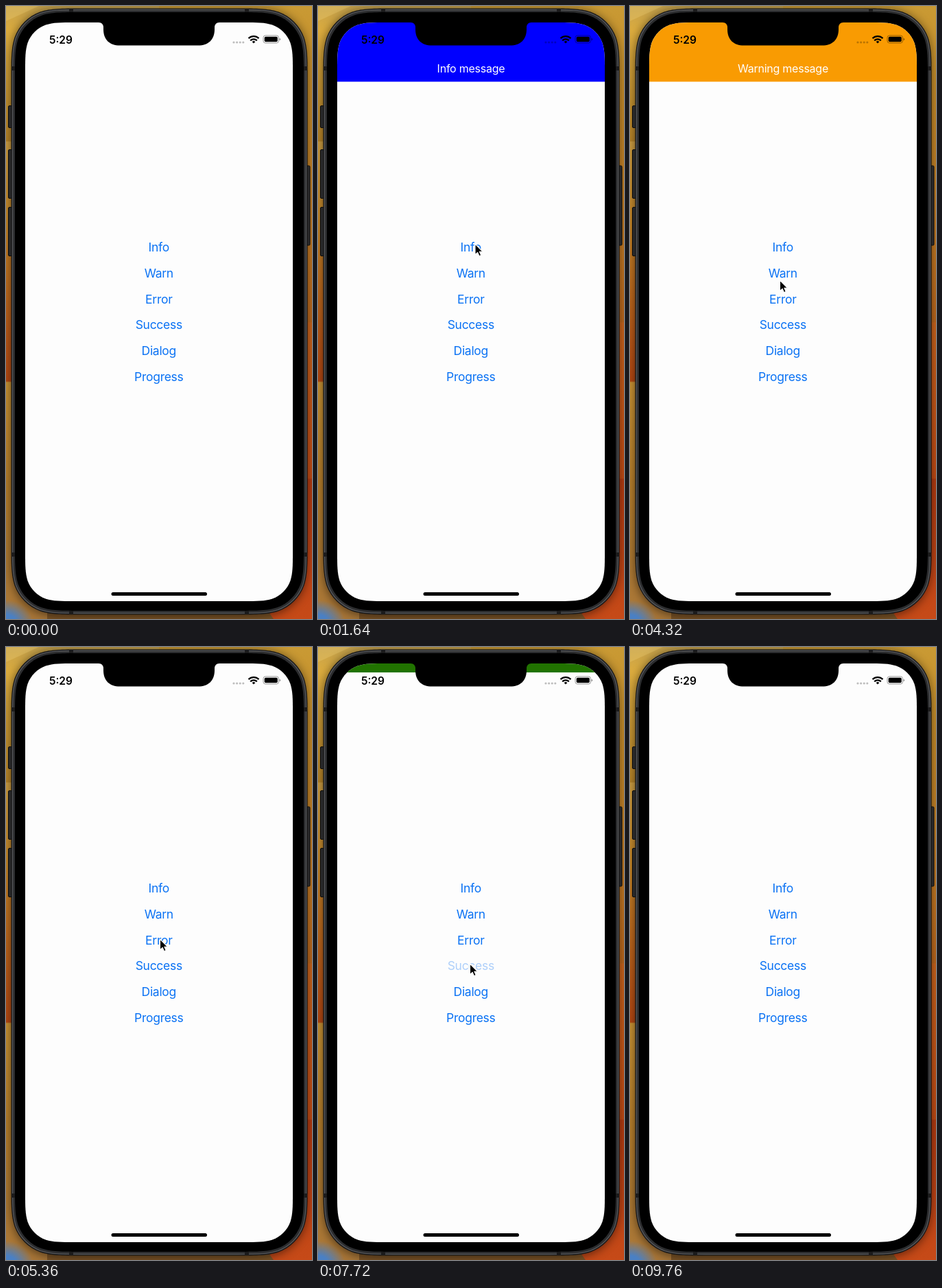
Recreate the animation shown at these times as an HTML page. Size 446x894 px, loop 9.8 s.

```html
<!DOCTYPE html>
<html lang="en">
<head>
<meta charset="utf-8">
<title>Banner messages</title>
<style>
  html, body { margin: 0; width: 100%; height: 100%; overflow: hidden; background: #b87a28; }
  svg { display: block; }
  text { font-family: Inter, sans-serif; text-anchor: middle; }
  #labels { font-size: 17.5px; letter-spacing: -.28px; fill: #0a72f4; }
  #title { font-size: 16px; letter-spacing: -.24px; fill: #fff; }
  #clock { font-size: 15.5px; font-weight: 600; }
</style>
</head>
<body>
<svg width="446" height="894" viewBox="0 0 446 894">
  <defs>
    <linearGradient id="left" x2="0" y2="1">
      <stop offset="0" stop-color="#c3a04c"/><stop offset=".04" stop-color="#dcac3e"/>
      <stop offset=".22" stop-color="#b98529"/><stop offset=".222" stop-color="#cf9f42"/>
      <stop offset=".36" stop-color="#c58527"/><stop offset=".5" stop-color="#bd621b"/>
      <stop offset=".612" stop-color="#b64812"/><stop offset=".614" stop-color="#cb9434"/>
      <stop offset=".78" stop-color="#b9802c"/><stop offset="1" stop-color="#a87638"/>
    </linearGradient>
    <linearGradient id="right" x2="0" y2="1">
      <stop offset="0" stop-color="#c99a34"/><stop offset=".12" stop-color="#c48c2a"/>
      <stop offset=".4" stop-color="#c07622"/><stop offset=".515" stop-color="#b9651c"/>
      <stop offset=".517" stop-color="#c8631c"/><stop offset=".77" stop-color="#c04a14"/>
      <stop offset=".772" stop-color="#b23a10"/><stop offset="1" stop-color="#c64a18"/>
    </linearGradient>
    <radialGradient id="blue">
      <stop offset=".4" stop-color="#4a80c4"/><stop offset="1" stop-color="#4a80c4" stop-opacity="0"/>
    </radialGradient>
    <filter id="soft"><feGaussianBlur stdDeviation="7"/></filter>
    <clipPath id="screen"><path data-box="28 24 390 844 47.3"/></clipPath>
  </defs>

  <!-- wallpaper -->
  <rect width="223" height="894" fill="url(#left)"/>
  <rect x="223" width="223" height="894" fill="url(#right)"/>
  <path d="M0 22L48 0H0Z" fill="#e6c56c" opacity=".4"/>
  <path d="M60 880H380L390 894H60Z" fill="#7c5426"/>
  <ellipse cx="0" cy="902" rx="40" ry="36" fill="url(#blue)"/>
  <path data-box="7 4 432 886 67" opacity=".5" filter="url(#soft)"/>

  <!-- phone -->
  <g fill="#29292a" stroke="#0c0c0c">
    <rect x="3.5" y="145.5" width="7" height="32" rx="1.5"/>
    <rect x="3.5" y="209.5" width="7" height="71" rx="1.5"/>
    <rect x="3.5" y="293.5" width="7" height="71" rx="1.5"/>
    <rect x="436" y="233" width="7" height="116" rx="1.5"/>
  </g>
  <path data-box="7.5 3.5 432 884 67" fill="#161617"/>
  <path data-box="9.5 5.5 428 880 65" fill="#2c2d2f" stroke="#56575a" stroke-width="1.4"/>
  <path d="M92 6.5h6M348 6.5h6M92 884.5h6M348 884.5h6M10.5 88v6M436.5 88v6M10.5 797v6M436.5 797v6" stroke="#1b1b1c" stroke-width="5"/>
  <path data-box="13 9 421 873 62"/>

  <g clip-path="url(#screen)">
    <rect x="28" y="24" width="390" height="844" fill="#fdfdfd"/>
    <g id="labels"></g>
    <g id="banner">
      <rect id="fill" x="28" y="24" width="390" height="86.4"/>
      <text id="title" x="223" y="96.5"></text>
    </g>
    <text id="clock" x="79.9" y="54.5">5:29</text>
    <g opacity=".25">
      <circle cx="332" cy="53" r="1.6"/><circle cx="336.6" cy="53" r="1.6"/>
      <circle cx="341.2" cy="53" r="1.6"/><circle cx="345.8" cy="53" r="1.6"/>
    </g>
    <g fill="none" stroke="#000" stroke-width="2.3">
      <path d="M353.5 47.2a10.8 10.8 0 0 1 15 0M356.2 50.3a6.9 6.9 0 0 1 9.6 0"/>
      <path d="M361 54.6l-2.3-2.4a3.3 3.3 0 0 1 4.6 0z" fill="#000" stroke="none"/>
    </g>
    <rect x="375" y="43" width="22.5" height="11" rx="3.2" fill="none" stroke="#000" opacity=".4"/>
    <rect x="376.7" y="44.7" width="19.1" height="7.6" rx="1.8"/>
    <path d="M398.6 46.8q1.6.7 1.6 1.8t-1.6 1.8z" opacity=".45"/>
    <path d="M135 24q7 0 7 8v2c0 15 9 23.6 24 23.6h114c15 0 24-8.6 24-23.600v-2q0-8 7-8z"/>
    <rect x="153.5" y="855" width="139.5" height="5" rx="2.5"/>
  </g>
  <path id="cursor" d="M0 0V15.6L3.6 12.300L6 17.700L8.700 16.600L6.400 11.300H11.100Z" stroke="#fff" stroke-width="1.1" stroke-linejoin="round"/>
</svg>
<script>
const LOOP = 9800, SLIDE = 350, HOLD = 1500, PRESS = 90, HEIGHT = 86.4;
const $ = id => document.getElementById(id);

const messages = [
  { start: 1137, color: "#0000ff", text: "Info message" },
  { start: 3300, color: "#f99b02", text: "Warning message" },
  { start: 5480, color: "#f20e00", text: "Error message" },
  { start: 7635, color: "#217300", text: "Success message" },
];

// time, x, y of the pointer tip
const path = [
  [350, 450, 520], [950, 229, 347], [1900, 229, 347], [2800, 220.5, 379],
  [3700, 220.5, 380], [4320, 218.5, 400], [5100, 224.5, 426], [6500, 224.5, 426],
  [7300, 221.5, 462], [8350, 221.5, 462], [8950, 450, 560],
];

// Box with continuous corners: each corner eases into the straight sides.
function smoothBox(x, y, w, h, r) {
  const corner = [
    [1.529, 0], [1.088, 0], [.868, 0], [.631, .075], [.373, .169],
    [.169, .373], [.075, .631], [0, .868], [0, 1.088], [0, 1.529],
  ];
  const place = (right, bottom) => {
    const points = corner.map(([u, v]) =>
      [right ? x + w - u * r : x + u * r, bottom ? y + h - v * r : y + v * r]);
    if (right !== bottom) points.reverse();
    return `${points[0]}C${points.slice(1).join(" ")}`;
  };
  return `M${place(0, 0)}L${place(0, 1)}L${place(1, 1)}L${place(1, 0)}Z`;
}
document.querySelectorAll("[data-box]").forEach(el =>
  el.setAttribute("d", smoothBox(...el.dataset.box.split(" ").map(Number))));

const labels = ["Info", "Warn", "Error", "Success", "Dialog", "Progress"].map((name, i) => {
  const label = document.createElementNS("http://www.w3.org/2000/svg", "text");
  label.textContent = name;
  label.setAttribute("x", 222.8);
  label.setAttribute("y", 358.3 + i * 37.67);
  return $("labels").appendChild(label);
});

const ease = (t, from, span) => {
  const u = Math.min(1, Math.max(0, (t - from) / span));
  return u * u * (3 - 2 * u);
};

function drawBanner(t) {
  const message = messages.find(m => t >= m.start && t < m.start + HOLD + SLIDE);
  $("banner").style.display = message ? "" : "none";
  if (!message) return;
  const shown = ease(t, message.start, SLIDE) - ease(t, message.start + HOLD, SLIDE);
  $("banner").setAttribute("transform", `translate(0 ${(shown - 1) * HEIGHT})`);
  $("fill").setAttribute("fill", message.color);
  $("title").textContent = message.text;
}

function drawCursor(t) {
  const i = path.findIndex(p => p[0] > t);
  $("cursor").style.display = i > 0 ? "" : "none";
  if (i < 1) return;
  const [t0, x0, y0] = path[i - 1], [t1, x1, y1] = path[i];
  const k = ease(t, t0, t1 - t0);
  $("cursor").setAttribute("transform", `translate(${x0 + (x1 - x0) * k} ${y0 + (y1 - y0) * k})`);
}

function draw(now) {
  const t = now % LOOP;
  messages.forEach(({ start }, i) => {
    labels[i].style.opacity = t < start - PRESS ? 1 : 0.2 + 0.8 * ease(t, start, SLIDE);
  });
  drawBanner(t);
  drawCursor(t);
  requestAnimationFrame(() => draw(performance.now() - begin));
}

const begin = performance.now();
draw(0);
</script>
</body>
</html>
```
